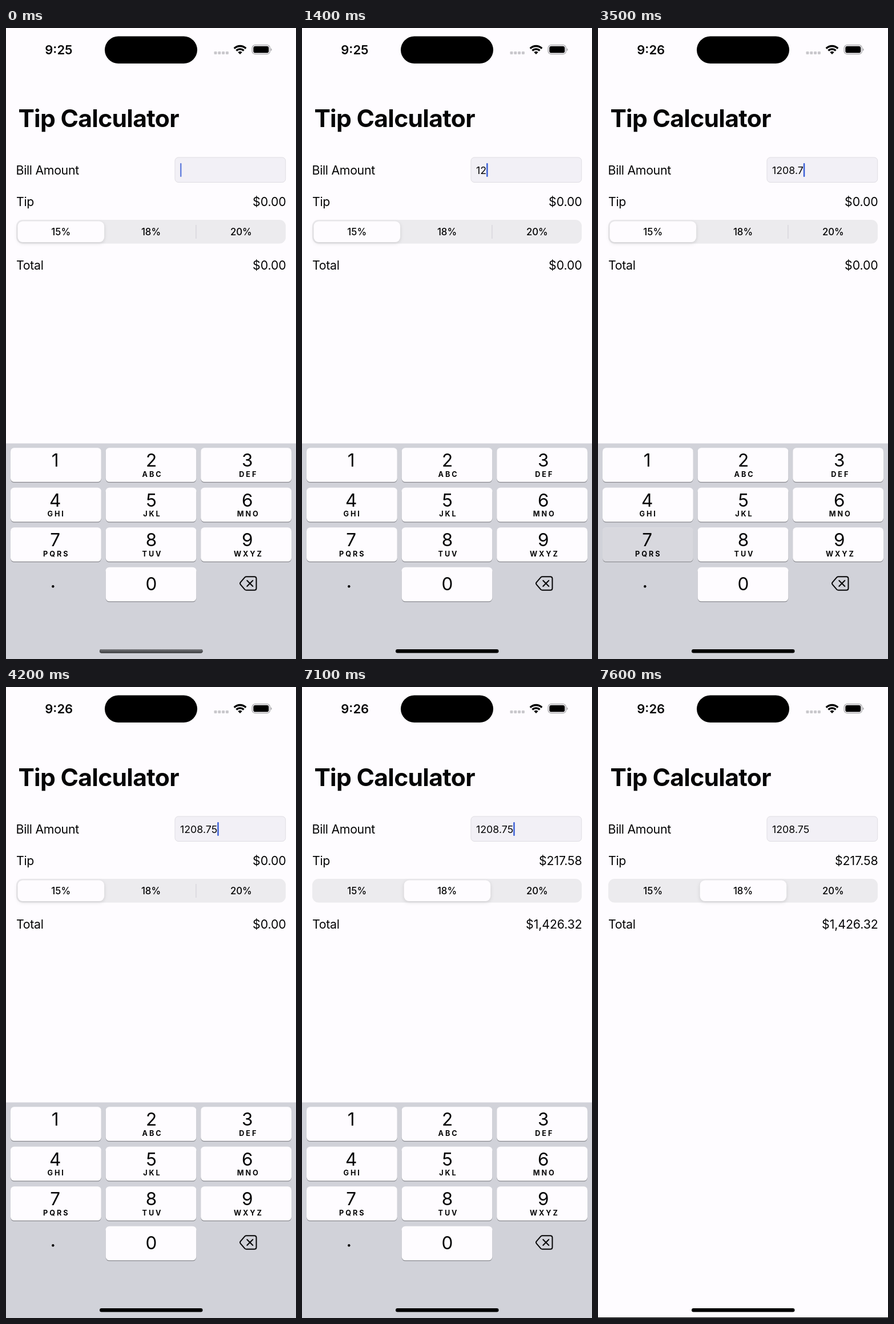
These frames come from a looping animation (508x1102 px, 7700 ms). An HTML page:

```html
<!DOCTYPE html>
<html lang="en">
<head>
<meta charset="utf-8">
<title>Tip Calculator</title>
<style>
  html, body { margin: 0; width: 100%; height: 100%; overflow: hidden; background: #fefcff; }
  svg { display: block; }
  text {
    font-family: Inter, "Liberation Sans", sans-serif;
    font-optical-sizing: none;
    fill: #050506;
    white-space: pre;
  }
  .title { font-size: 42.6px; font-weight: 700; letter-spacing: -.7px; }
  .clock { font-size: 22px; font-weight: 600; }
  .label { font-size: 21.3px; letter-spacing: -.3px; }
  .money { font-size: 21.3px; letter-spacing: -.1px; text-anchor: end; }
  .entry { font-size: 17.8px; }
  .seg { font-size: 16.8px; font-weight: 450; text-anchor: middle; }
  .seg.on { font-weight: 550; }
  .digit { font-size: 31.5px; text-anchor: middle; }
  .letters { font-size: 12.7px; font-weight: 700; letter-spacing: 2.9px; text-anchor: middle; }
  #thumb { filter: drop-shadow(0 2px 3px rgba(0, 0, 0, .13)); }
</style>
</head>
<body>
<svg width="508" height="1102" viewBox="0 0 508 1102">
  <defs>
    <linearGradient id="dim" x2="0" y2="1">
      <stop stop-color="#77787c"/>
      <stop offset="1" stop-color="#3c3d40"/>
    </linearGradient>
  </defs>
  <rect width="508" height="1102" fill="#fefcff"/>

  <!-- status bar -->
  <text id="clock" class="clock" x="68.3" y="46"></text>
  <rect x="173" y="14.5" width="162" height="47.5" rx="23.75"/>
  <g fill="#c9c8cc">
    <rect x="364.5" y="41" width="5" height="5" rx="1.3"/>
    <rect x="371.3" y="41" width="5" height="5" rx="1.3"/>
    <rect x="378.1" y="41" width="5" height="5" rx="1.3"/>
    <rect x="384.9" y="41" width="5" height="5" rx="1.3"/>
  </g>
  <g fill="none" stroke="#000" stroke-width="3.3">
    <path d="M399.75 35.75A14.5 14.5 0 0 1 420.25 35.75"/>
    <path d="M403.5 39.5A9.2 9.2 0 0 1 416.5 39.5"/>
  </g>
  <path d="M410 46L406.3 42.3A5.2 5.2 0 0 1 413.7 42.3Z"/>
  <rect x="431.2" y="29.7" width="31.2" height="16" rx="5.3" fill="none" stroke="#a5a4a8" stroke-width="1.3"/>
  <rect x="433.3" y="31.8" width="27" height="11.8" rx="3.4"/>
  <path d="M463.8 35.2q1.9 .8 1.9 2.5t-1.9 2.5z" fill="#a5a4a8"/>

  <!-- form -->
  <text class="title" x="21.4" y="173">Tip Calculator</text>
  <text class="label" x="17.5" y="256">Bill Amount</text>
  <rect x="296" y="226" width="193.7" height="43.5" rx="6" fill="#f2f0f6" stroke="#dfdde3"/>
  <text id="entry" class="entry" x="305" y="254.5"></text>
  <rect id="caret" y="236" width="2.5" height="24" rx="1" fill="#3a5fd6"/>
  <text class="label" x="18" y="310.8">Tip</text>
  <text id="tip" class="money" x="490.6" y="310.8"></text>
  <rect x="18" y="335" width="472" height="41.5" rx="11" fill="#ecebee"/>
  <g id="dividers" fill="#d3d2d7">
    <rect x="174.8" y="344" width="1.2" height="24"/>
    <rect x="332.3" y="344" width="1.2" height="24"/>
  </g>
  <rect id="thumb" y="337.4" width="151.6" height="36.7" rx="9" fill="#fefcff"/>
  <g id="segs">
    <text class="seg" x="96.2" y="362">15%</text>
    <text class="seg" x="254" y="362">18%</text>
    <text class="seg" x="411.8" y="362">20%</text>
  </g>
  <text class="label" x="18" y="422.3">Total</text>
  <text id="total" class="money" x="490.6" y="422.3"></text>

  <!-- keyboard -->
  <g id="keyboard">
    <rect y="725.5" width="508" height="377" fill="#d1d2d9"/>
    <g id="keys"></g>
    <circle cx="82.3" cy="975.3" r="2.2"/>
    <g fill="none" stroke="#050506" stroke-width="2" stroke-linecap="round" stroke-linejoin="round" transform="translate(.5 0)">
      <path d="M420.5 958.2H434.5Q438 958.2 438 961.7V978.3Q438 981.8 434.5 981.8H420.5Q419 981.8 417.8 980.6L410.2 971.8Q408.8 970 410.2 968.2L417.8 959.4Q419 958.2 420.5 958.2Z"/>
      <path d="M421.8 965l10 10m0-10l-10 10"/>
    </g>
  </g>
  <rect x="164" y="1085" width="180.5" height="6.5" rx="3.25"/>
  <rect id="homeDim" x="164" y="1085" width="180.5" height="6.5" rx="3.25" fill="url(#dim)"/>
  <rect id="edge" y="1101" width="508" height="1"/>
</svg>

<script>
const LOOP = 7700, STEP = 100, BILL = 1208.75;
const RATES = [.15, .18, .20];
const LETTERS = ["", "ABC", "DEF", "GHI", "JKL", "MNO", "PQRS", "TUV", "WXYZ"];

// key, time pressed, time held down
const TAPS = [
  ["1", 700, 100], ["2", 1100, 200], ["0", 1800, 100], ["8", 2200, 100],
  [".", 2900, 100], ["7", 3400, 100], ["5", 4000, 100]
];
// time, selected segment
const PICKS = [[-9999, 0], [4656, 1], [5456, 2], [6556, 1]];
const DISMISS = 7130;

const $ = id => document.getElementById(id);
const clamp = v => Math.max(0, Math.min(1, v));

// rounds half a cent to the even cent
function money(v) {
  const c = Math.round(v * 1000) / 10;
  const cents = c % 1 === .5 ? 2 * Math.round(c / 2) : Math.round(c);
  return "$" + (cents / 100).toLocaleString("en-US", { minimumFractionDigits: 2 });
}

// critically damped spring, 0 to 1
function spring(ms) {
  const x = Math.max(0, ms) / 1000 * Math.sqrt(1000 / 3);
  return 1 - (1 + x) * Math.exp(-x);
}

function add(parent, name, attrs, content = "") {
  const el = document.createElementNS("http://www.w3.org/2000/svg", name);
  for (const k in attrs) el.setAttribute(k, attrs[k]);
  el.textContent = content;
  return parent.appendChild(el);
}

const caps = {};
function addKey(digit, letters, col, row) {
  const x = 8 + col * 166.6, y = 733.2 + row * 69.5, cx = 86.2 + col * 168.3;
  const box = { x, width: 158.8, height: 59.6, rx: 6.5 };
  add($("keys"), "rect", { ...box, y: y + 1.3, fill: "#88898e" });
  add($("keys"), "rect", { ...box, y, fill: "#fefcff" });
  caps[digit] = add($("keys"), "rect", { ...box, y, fill: "#b3b6be", opacity: 0 });
  const mid = y + (row === 3 ? 28.7 : 21.3);
  add($("keys"), "text", { class: "digit", x: cx, y: mid + 11.5 }, digit);
  add($("keys"), "text", { class: "letters", x: cx + 2, y: y + 50.5 }, letters);
}
LETTERS.forEach((s, i) => addKey(String(i + 1), s, i % 3, Math.floor(i / 3)));
addKey("0", "", 1, 3);

function caretOpacity(t) {
  if (t >= 7200) return 0;
  if (t >= 600 && t < 4600) return 1;
  const phase = (t < 600 ? t + 50 : t - 4600) % 1000;
  return phase < 500 ? clamp((Math.abs(phase - 250) - 50) / 200) : 1;
}

function drawSegments(t) {
  const n = PICKS.filter(p => p[0] <= t).length - 1;
  const [at, now] = PICKS[n], before = n ? PICKS[n - 1][1] : now;
  const p = spring(t - at), mix = (a, b) => a + (b - a) * p;
  $("thumb").setAttribute("x", 20.5 + 158.1 * mix(before, now));
  [2, 0].forEach((s, i) =>
    $("dividers").children[i].setAttribute("opacity", mix(+(before === s), +(now === s))));
  [...$("segs").children].forEach((el, i) => el.classList.toggle("on", i === now));
  const tip = n ? BILL * RATES[now] : 0;
  $("tip").textContent = money(tip);
  $("total").textContent = money(n ? BILL + tip : 0);
}

function draw(t) {
  $("clock").textContent = t < 1800 ? "9:25" : "9:26";
  $("entry").textContent = TAPS.filter(k => k[1] <= t).map(k => k[0]).join("");
  $("caret").setAttribute("x", 305 + $("entry").getComputedTextLength());
  $("caret").setAttribute("opacity", caretOpacity(t));
  for (const [key, at, hold] of TAPS) {
    const level = t < at ? 0 : clamp(1 - (t - at - hold + 50) / 100);
    if (caps[key]) caps[key].setAttribute("opacity", level);
  }
  drawSegments(t);
  $("keyboard").setAttribute("transform", `translate(0 ${377 * spring(t - DISMISS)})`);
  $("homeDim").setAttribute("opacity", t < 700 ? 1 : clamp((900 - t) / 300));
  $("edge").setAttribute("opacity", t >= 7200 ? 1 : 0);
}

const start = performance.now();
function tick() {
  const t = (performance.now() - start) % LOOP;
  draw(Math.floor(t / STEP) * STEP);
  requestAnimationFrame(tick);
}
tick();
</script>
</body>
</html>
```
